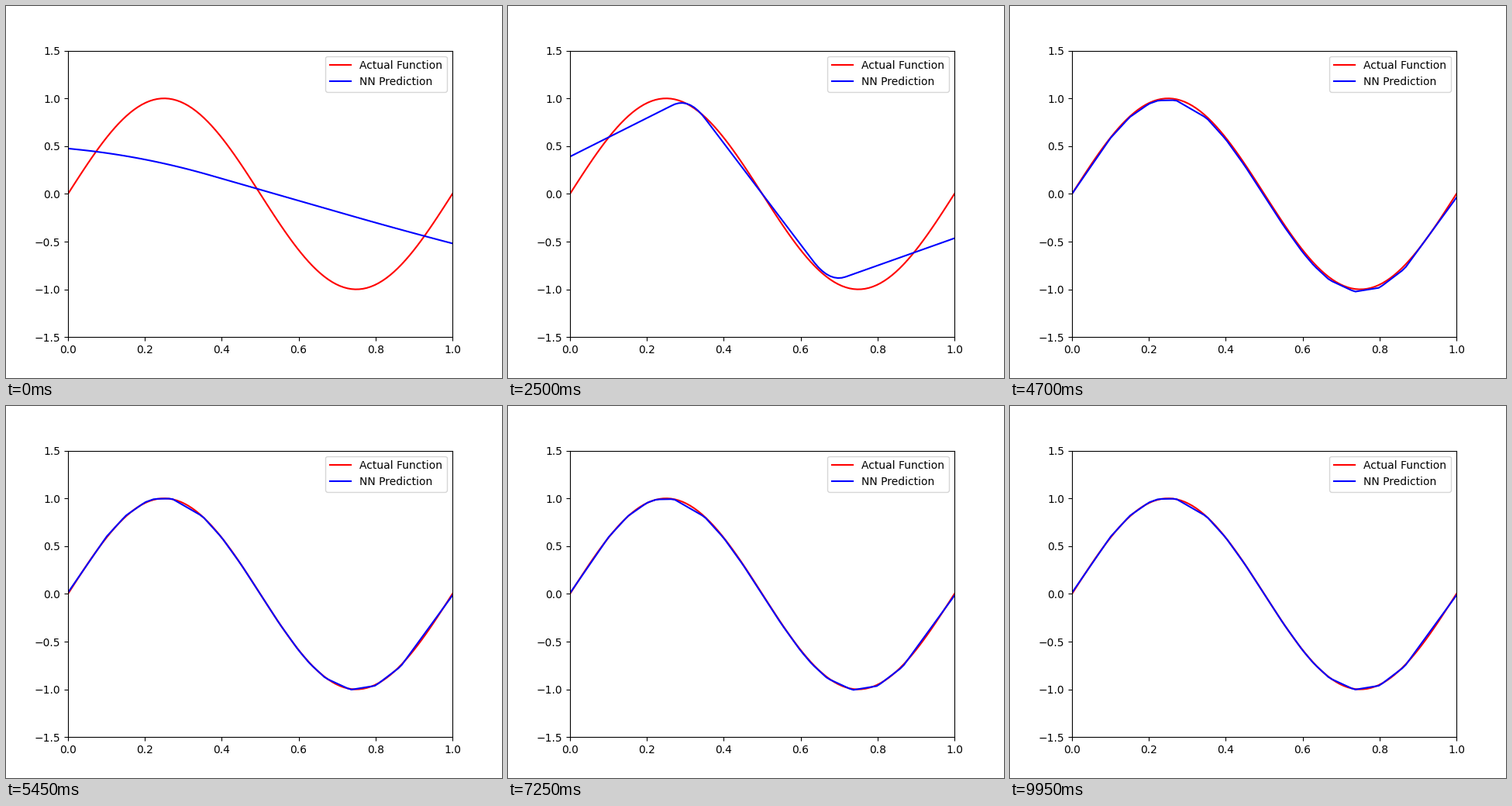
Animation of 640x480 px, one loop 10 s. Source, as a matplotlib script:

```python
import numpy as np
import matplotlib.pyplot as plt
from matplotlib.animation import FuncAnimation

FRAMES, INTERVAL = 200, 50
x = np.linspace(0, 1, 100)


def target(v):
    return np.sin(2 * np.pi * v)


def ramp(d, w):
    """A hinge at 0 whose corner is rounded over a half-width w."""
    return np.where(np.abs(d) < w, (d + w) ** 2 / (4 * w), np.maximum(d, 0))


def bent(*points, w=.042):
    """Early fit: straight pieces through a few points, with rounded corners."""
    px, py = np.array(points).T
    slopes = np.diff(py) / np.diff(px)
    y = py[0] + slopes[0] * x
    for corner, turn in zip(px[1:-1], np.diff(slopes)):
        y = y + turn * ramp(x - corner, w)
    return y


def chords(left, right):
    """Late fit: chords of the target curve, offset a little at each end."""
    corners = [0, .1, .15, .2, .225, .27, .35, .4, .45, .55,
               .6, .63, .67, .735, .8, .865, 1]
    return np.interp(x, corners, target(np.array(corners))) + left + (right - left) * x


# Stages of the training: seconds and fitted curve
stages = {
    0: bent((0, .475), (.2, .391), (.9, -.418), (1, -.52), w=.17),
    .6: bent((0, 1.03), (.3, .64), (.65, -.5), (1, -1.1)),
    1.25: bent((0, .702), (.307, .641), (.649, -.479), (1, -.828)),
    2.5: bent((0, .39), (.309, 1.014), (.675, -.929), (1, -.465)),
    3.15: bent((0, .2), (.3, 1.14), (.7, -1.15), (1, -.22)),
    4.7: chords(0, -.04),
    6.15: chords(.027, .005),
    8.4: chords(.02, -.01),
    9.95: chords(.012, -.015),
}
times, fits = list(stages), list(stages.values())


def wobble(t):
    """Brief instability of the training, dying away."""
    s = max(t - 6.5, 0)
    return .08 * np.sin(2 * np.pi * s / .4) * np.exp(-s / .6)


def prediction(t):
    k = min(np.searchsorted(times, t, side="right"), len(times) - 1)
    u = (t - times[k - 1]) / (times[k] - times[k - 1])
    return (1 - u) * fits[k - 1] + u * fits[k] + wobble(t)


fig, ax = plt.subplots(figsize=(6.4, 4.8), dpi=100)
ax.set_xlim(0, 1)
ax.set_ylim(-1.5, 1.5)
ax.plot(x, target(x), color="red", label="Actual Function")
line, = ax.plot(x, fits[0], color="blue", label="NN Prediction")
ax.legend(loc="upper right")


def update(frame):
    line.set_ydata(prediction(frame * INTERVAL / 1000))
    return line,


anim = FuncAnimation(fig, update, frames=FRAMES, interval=INTERVAL, repeat=True)
plt.show()
```
